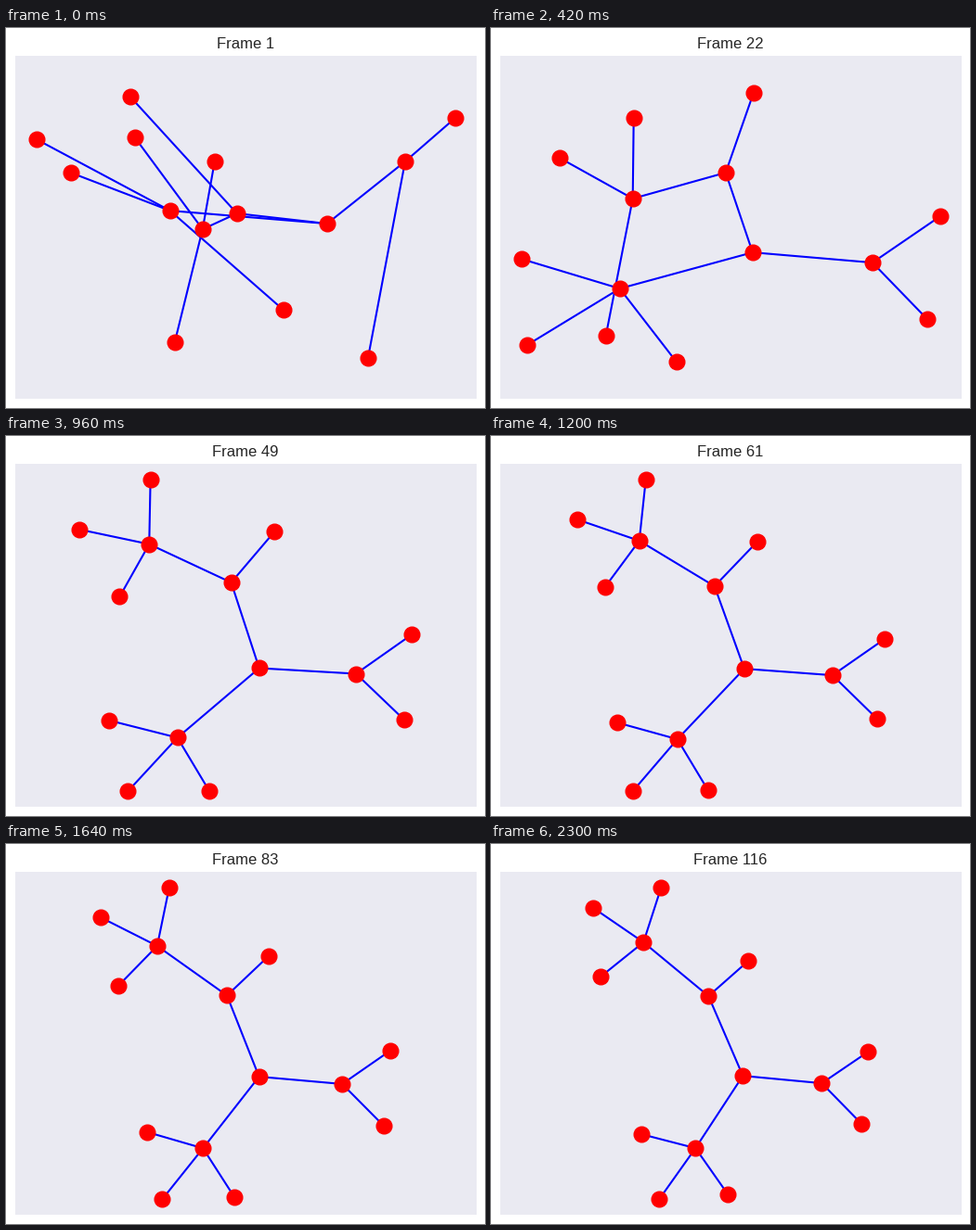
A matplotlib script for the animation above (2.32 s loop, 516x410 px).

```python
import numpy as np
import matplotlib.pyplot as plt
from matplotlib.animation import FuncAnimation
from matplotlib.collections import LineCollection
from matplotlib.patches import Rectangle

WIDTH, HEIGHT, DPI = 516, 410, 100
FRAMES, INTERVAL = 116, 20
CENTRE = np.array([258.3, 215.1])
BOX = np.array([451.4, 336.2])  # area the node centres are scaled into

EDGES = np.array([(0, 1), (0, 2), (0, 3), (0, 4), (4, 5), (4, 6), (6, 7),
                  (7, 8), (7, 9), (6, 10), (10, 11), (10, 12), (10, 13)])

# Key poses of the graph in pixels: x row, then y row
POSES = {
    0: [[212, 139, 225, 182, 249, 134, 346, 430, 484, 390, 177, 33, 70, 299],
        [217, 118, 144, 339, 200, 74, 211, 144, 97, 356, 197, 120, 156, 304]],
    21: [[153, 74, 154, 124, 253, 283, 282, 411, 484, 470, 139, 33, 39, 200],
         [184, 140, 97, 332, 156, 70, 242, 253, 203, 314, 281, 249, 342, 360]],
    37: [[141, 55, 139, 115, 242, 288, 273, 393, 461, 450, 158, 65, 95, 200],
         [121, 107, 47, 188, 148, 79, 246, 251, 203, 307, 320, 297, 378, 383]],
    60: [[160, 93, 167, 123, 241, 287, 273, 368, 424, 416, 201, 136, 153, 234],
         [113, 90, 47, 163, 162, 114, 251, 258, 219, 305, 327, 309, 383, 382]],
    115: [[164, 110, 183, 118, 234, 277, 271, 356, 406, 399, 220, 162, 181, 255],
          [106, 69, 47, 143, 164, 126, 250, 258, 224, 302, 328, 313, 383, 378]],
}

NODES = EDGES.max() + 1
laplacian = np.zeros((NODES, NODES))
for a, b in EDGES:
    laplacian[[a, b], [a, b]] += 1
    laplacian[[a, b], [b, a]] -= 1


def fit(p):
    """Scale a layout evenly so that it fills the box."""
    low, high = p.min(-2, keepdims=True), p.max(-2, keepdims=True)
    scale = (BOX / (high - low)).min(-1, keepdims=True)
    return CENTRE + (p - (low + high) / 2) * scale


def force(p):
    """Inverse-square repulsion between all nodes, linear springs on edges."""
    delta = p[..., :, None, :] - p[..., None, :, :]
    dist2 = (delta ** 2).sum(-1) + np.eye(NODES)
    return (delta / dist2[..., None] ** 1.5).sum(-2) - laplacian @ p


def relax(start, scale, rate, steps):
    """Yield the layout after each step; scale and rate may be batches."""
    scale, rate = (np.asarray(v)[..., None, None] for v in (scale, rate))
    p = start / scale
    for _ in range(steps):
        p = p + rate * force(p)
        yield p


def calibrate(start, end, steps):
    """Find the scale and rate that bring start closest to end."""
    axis = np.linspace(-1, 1, 20)
    offsets = np.stack(np.meshgrid(axis, axis), -1).reshape(-1, 2)
    best, spread = np.log([120, 0.04]), np.log([4, 12])
    for _ in range(3):
        grid = best + spread * offsets
        for p in relax(start, *np.exp(grid).T, steps):
            pass
        error = np.abs(fit(p) - end).sum((-1, -2))
        best = grid[np.nan_to_num(error, nan=1e9, posinf=1e9).argmin()]
        spread = spread * 0.12
    return np.exp(best)


def travel(start, end, steps):
    """Relax from one pose to the next, easing out what is left over."""
    scale, rate = calibrate(start, end, steps)
    path = np.array([fit(p) for p in relax(start, scale, rate, steps)])
    share = np.arange(1, steps + 1)[:, None, None] / steps
    return fit(path + share * (end - path[-1]))


def build_layouts():
    times = list(POSES)
    poses = [fit(np.array(p, float).T) for p in POSES.values()]
    parts = [poses[0][None]]
    with np.errstate(all="ignore"):
        for i in range(len(times) - 1):
            parts.append(travel(poses[i], poses[i + 1], times[i + 1] - times[i]))
    return np.concatenate(parts)


layouts = build_layouts()

# The small margin keeps the pixel size from being rounded down
fig = plt.figure(figsize=((WIDTH + 0.01) / DPI, (HEIGHT + 0.01) / DPI),
                 dpi=DPI, facecolor="white")
ax = fig.add_axes([0, 0, 1, 1])
ax.set_xlim(0, WIDTH)
ax.set_ylim(HEIGHT, 0)
ax.axis("off")

ax.add_patch(Rectangle((10, 30), 497, 370, facecolor="#eaeaf2", linewidth=0))
title = ax.text(258, 22, "", ha="center", va="baseline", fontsize=12,
                family="Liberation Sans", color="#262626")
links = LineCollection([], colors="#0000ff", linewidths=1.5, zorder=2)
ax.add_collection(links)
dots, = ax.plot([], [], "o", color="#ff0000", markersize=12,
                markeredgewidth=1, zorder=3)


def draw(i):
    p = layouts[i]
    title.set_text(f"Frame {i + 1}")
    links.set_segments(p[EDGES])
    dots.set_data(p[:, 0], p[:, 1])
    return title, links, dots


anim = FuncAnimation(fig, draw, frames=FRAMES, interval=INTERVAL,
                     repeat=True, repeat_delay=0)
plt.show()
```
